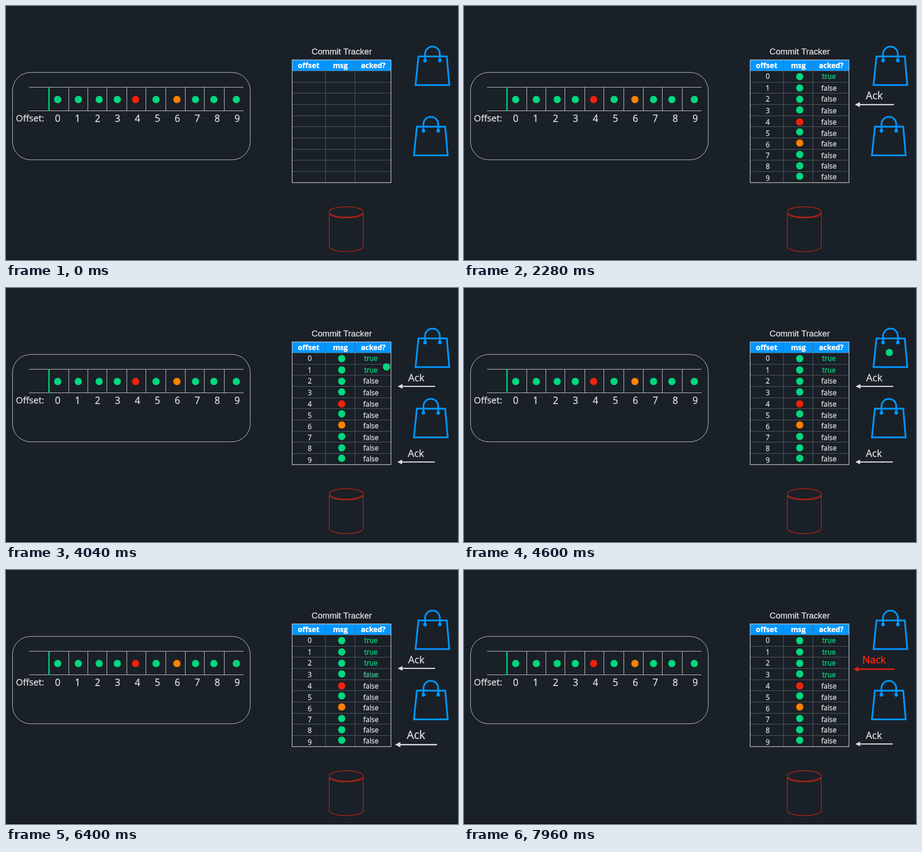
An HTML page with a canvas for the animation above (8 s loop, 997 by 561 pixels).

```html
<!DOCTYPE html>
<html lang="en">
<head>
<meta charset="utf-8">
<title>Commit Tracker</title>
<style>
html, body { margin: 0; width: 100%; height: 100%; overflow: hidden; background: #1a2027; }
canvas { display: block; }
</style>
</head>
<body>
<canvas id="stage" width="997" height="561"></canvas>
<script>
const ctx = document.getElementById('stage').getContext('2d');
const LOOP = 8000, STEP = 40;
const BG = '#1a2027', INK = '#dcdcdc', BLUE = '#0096ff';
const GREEN = '#00d77f', RED = '#ee220c', ORANGE = '#ff8000';
const SANS = '"Open Sans", "Noto Sans", sans-serif';

const queueX = [114, 159.5, 205.5, 245.5, 286, 331, 377, 418, 458.5, 508];
const dividers = [138.5, 180.5, 222.5, 266.5, 308.5, 352.5, 395.5, 437.5, 481.5];
const offsetY = [155, 181, 205, 231, 256, 281, 306, 330, 354, 380];
const stateY = [155, 181, 205, 231, 256, 281, 304, 330, 353, 377];
const dotY = [156, 181, 206, 229.5, 256, 278, 302.5, 328, 353, 376];
const colors = queueX.map((_, i) => i === 4 ? RED : i === 6 ? ORANGE : GREEN);

// Each message: bag, resting place, flash start, end of its acknowledgement.
const messages = [
  { bag: 0, x: 939, y: 143, flash: 1360, done: 2320 },
  { bag: 1, x: 938, y: 300, flash: 2680, done: 3840 },
  { bag: 0, x: 938, y: 142.5, flash: 4200, done: 5200 },
  { bag: 1, x: 936.5, y: 302.5, flash: 5560, done: 6560 },
  { bag: 0, x: 942, y: 141, flash: 6920, done: 7920 }
];
const FLY = 320, FADE = 200;

const span = (t, a, b) => Math.min(1, Math.max(0, (t - a) / (b - a)));
const ease = p => (1 - Math.cos(Math.PI * p)) / 2;
const mix = (a, b, p) => a + (b - a) * p;
const ackProgress = (t, m) => span(t, m.flash + 3 * FADE, m.done);

function line(points, color, width = 1) {
  ctx.beginPath();
  points.forEach(([x, y]) => ctx.lineTo(x, y));
  ctx.strokeStyle = color;
  ctx.lineWidth = width;
  ctx.stroke();
}

function polygon(points, color) {
  ctx.beginPath();
  points.forEach(([x, y]) => ctx.lineTo(x, y));
  ctx.fillStyle = color;
  ctx.fill();
}

function dot(x, y, color, r = 8) {
  ctx.beginPath();
  ctx.arc(x, y, r, 0, 2 * Math.PI);
  ctx.fillStyle = color;
  ctx.fill();
}

// A hairline of the same colour gives the letters a medium weight.
function label(str, x, y, size, { color = INK, weight = 400, family = SANS, edge = 0.4 } = {}) {
  ctx.font = `${weight} ${size}px ${family}`;
  ctx.textAlign = 'center';
  ctx.lineJoin = 'round';
  ctx.fillStyle = ctx.strokeStyle = color;
  ctx.lineWidth = edge;
  ctx.fillText(str, x, y);
  ctx.strokeText(str, x, y);
}

function withAlpha(alpha, draw) {
  if (alpha <= 0) return;
  ctx.save();
  ctx.globalAlpha = alpha;
  draw();
  ctx.restore();
}

function drawQueue() {
  ctx.beginPath();
  ctx.roundRect(14.4, 146.7, 524.3, 193, 40);
  ctx.strokeStyle = INK;
  ctx.lineWidth = 1;
  ctx.stroke();
  for (const y of [179.5, 231.5]) line([[51, y], [524, y]], INK);
  for (const x of dividers) line([[x, 180], [x, 231]], INK);
  line([[94.8, 179.5], [94.8, 232]], GREEN, 2.8);
  label('Offset:', 53, 255, 20);
  queueX.forEach((x, i) => {
    dot(x, 206.5, colors[i]);
    label(i, 114 + 44 * i, 255.5, 21);
  });
}

function drawTable() {
  label('Commit Tracker', 740.5, 107, 18.8, { family: '"Liberation Sans", Arial, sans-serif' });
  ctx.fillStyle = BLUE;
  ctx.fillRect(631, 119, 218, 24);
  for (let i = 0; i < 10; i++) {
    const y = Math.round(143 + 24.65 * i) + 0.5;
    line([[631, y], [849, y]], '#5b6167');
  }
  for (const x of [704.5, 769.5]) line([[x, 119], [x, 390]], '#5b6167');
  ctx.strokeStyle = INK;
  ctx.lineWidth = 1.2;
  ctx.strokeRect(631.2, 119.2, 218, 271);
  const head = { color: '#fff', weight: 700 };
  label('offset', 667.5, 137, 16.3, head);
  label('msg', 737.5, 137, 16, head);
  label('acked?', 810, 137, 15.8, head);
}

function drawRows(t) {
  const move = ease(span(t, 480, 800));
  withAlpha(span(t, 800, 1000), () => {
    for (let i = 0; i < 10; i++) {
      label(i, 670, offsetY[i] + 5.5, 15.5);
      const acked = i < 4 ? ackProgress(t, messages[i]) : 0;
      const base = ctx.globalAlpha;
      withAlpha(base * (1 - acked), () => label('false', 805, stateY[i] + 5.5, 15.5));
      withAlpha(base * acked, () => label('true', 805, stateY[i] + 5.5, 15.5, { color: GREEN }));
    }
  });
  if (move > 0) queueX.forEach((x, i) =>
    dot(mix(x, 740.5, move), mix(206.5, dotY[i], move), colors[i]));
}

function drawBag(dx, dy) {
  ctx.save();
  ctx.translate(dx, dy);
  ctx.lineJoin = 'miter';
  ctx.beginPath();
  ctx.moveTo(909.8, 111.3);
  ctx.lineTo(972.3, 111.3);
  ctx.lineTo(977.8, 174.6);
  ctx.lineTo(903.3, 174.6);
  ctx.closePath();
  ctx.moveTo(924.3, 120);
  ctx.lineTo(924.3, 106);
  ctx.arc(940.6, 106, 16.3, Math.PI, 0);
  ctx.lineTo(956.9, 120);
  ctx.strokeStyle = BLUE;
  ctx.lineWidth = 3.8;
  ctx.stroke();
  dot(924.3, 120.5, BLUE, 4);
  dot(956.9, 120.5, BLUE, 4);
  ctx.restore();
}

function drawCylinder() {
  ctx.strokeStyle = '#e0230f';
  ctx.lineWidth = 1.2;
  ctx.beginPath();
  ctx.ellipse(750.5, 454.8, 37.5, 11.5, 0, 0, 2 * Math.PI);
  ctx.stroke();
  ctx.beginPath();
  ctx.moveTo(713, 459);
  ctx.lineTo(713, 531);
  ctx.ellipse(750.5, 531, 37.5, 11.5, 0, Math.PI, 0, true);
  ctx.lineTo(788, 459);
  ctx.ellipse(750.5, 458, 37.5, 10, 0, 0, Math.PI);
  ctx.stroke();
}

function drawMessage(t, m, i) {
  const color = colors[i];
  const fly = ease(span(t, m.flash - FLY, m.flash));
  const glow = 1 - Math.abs(t - m.flash - FADE) / FADE;
  const [left, top, bottom] = m.bag ? [896, 266, 333] : [900, 110, 174];
  withAlpha(glow, () => polygon(
    [[left + 8.5, top], [left + 74, top], [left + 82, bottom], [left, bottom]], color));
  const fade = 1 - span(t, m.flash + 2 * FADE, m.flash + 3 * FADE);
  if (fly > 0) withAlpha(fade, () =>
    dot(mix(740.5, m.x, fly), mix(dotY[i], m.y, fly), color));
}

function arrow(tip, end, y, color, width) {
  line([[tip + 9, y], [end, y]], color, width);
  polygon([[tip, y], [tip + 10.5, y - 5.3], [tip + 10.5, y + 5.3]], color);
}

// The sign appears with its first acknowledgement and pulses with each one.
function drawAck(t, bag, fadeOut) {
  const own = messages.filter((m, i) => m.bag === bag && i < 4);
  const scale = 1 + 0.13 * own.reduce((s, m) => s + Math.sin(Math.PI * ackProgress(t, m)), 0);
  const shown = Math.min(1, 2 * ackProgress(t, own[0]));
  withAlpha(shown * (1 - fadeOut), () => {
    ctx.translate(905 - bag * 0.8, 205 + bag * 167);
    ctx.scale(scale, scale);
    label('Ack', 0, 0.5, 22);
    arrow(-41, 41.5, 12.3, INK, 2.6);
  });
}

function draw(t) {
  ctx.fillStyle = BG;
  ctx.fillRect(0, 0, 997, 561);
  ctx.fillStyle = '#000';
  ctx.fillRect(0, 560, 997, 1);
  drawQueue();
  drawTable();
  drawRows(t);
  drawCylinder();
  drawBag(0, 0);
  drawBag(-3.5, 155.2);
  messages.forEach((m, i) => drawMessage(t, m, i));
  const nack = ackProgress(t, messages[4]);
  drawAck(t, 0, nack);
  drawAck(t, 1, 0);
  withAlpha(nack, () => {
    label('Nack', 904.5, 206, 22.6, { color: RED, edge: 0.8 });
    arrow(859, 949.5, 219, RED, 3);
  });
}

const start = performance.now();
function tick() {
  const t = (performance.now() - start) % LOOP;
  draw(Math.floor(t / STEP) * STEP);
  requestAnimationFrame(tick);
}
tick();
</script>
</body>
</html>
```
